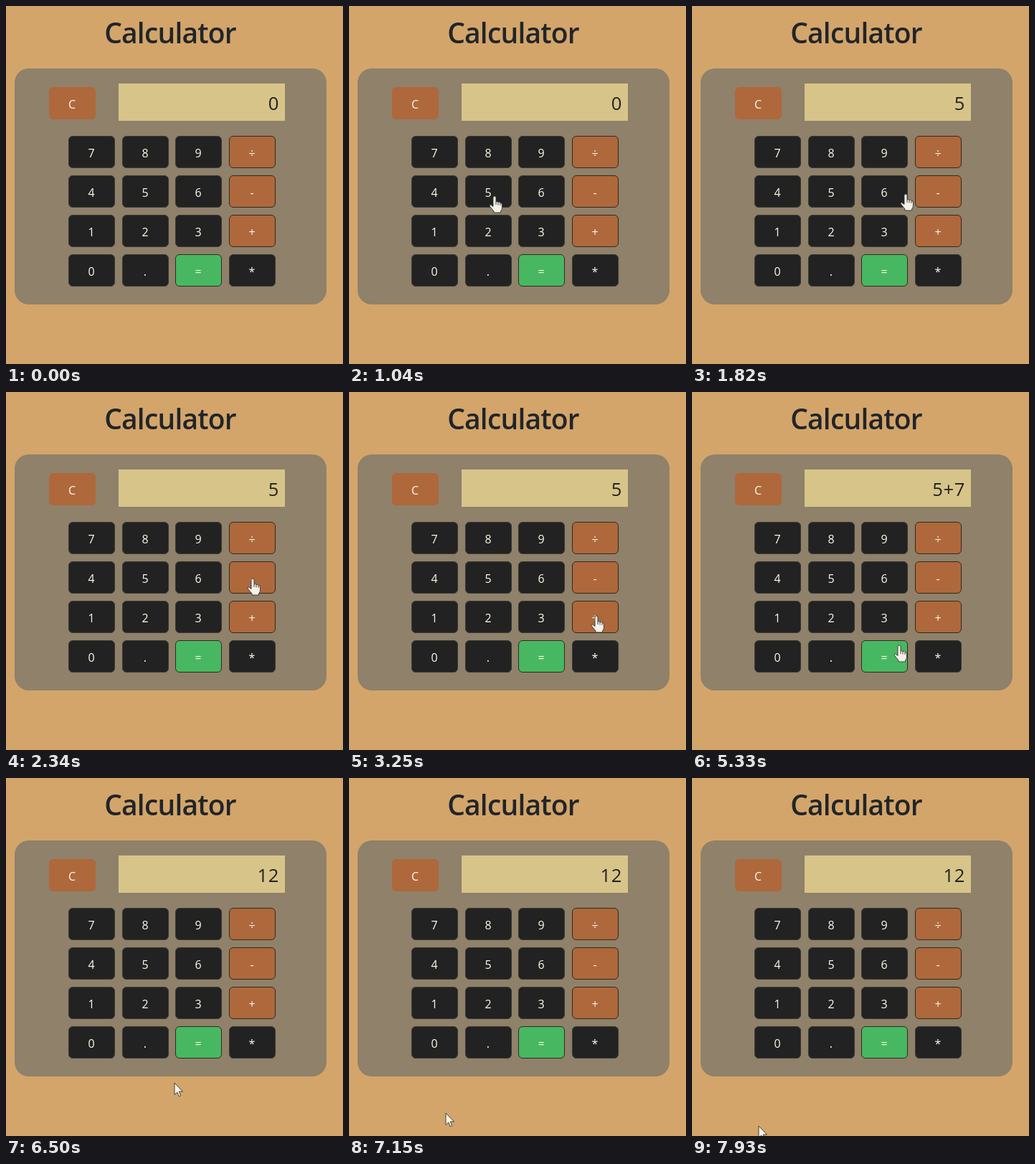
An HTML page for the animation above (8000 ms loop, 470x499 px).

```html
<!DOCTYPE html>
<html lang="en">
<head>
<meta charset="utf-8">
<title>Calculator</title>
<style>
  html, body { margin: 0; width: 100%; height: 100%; overflow: hidden; background: #d3a56a; }
  svg { display: block; }
  text { font: 500 16px "Open Sans", "Noto Sans", sans-serif; fill: #fffbea; text-anchor: middle; }
  text.title { font-size: 39px; font-weight: 600; letter-spacing: -.8px; fill: #212529; }
  text.display { font-size: 25.6px; font-weight: 400; letter-spacing: .6px; fill: #222; text-anchor: end; }
  #cursor path { fill: #f4f1e8; stroke: #333; stroke-width: .9; stroke-linejoin: round; }
</style>
</head>
<body>
<svg width="470" height="499" viewBox="0 0 470 499">
  <text class="title" x="229" y="52">Calculator</text>
  <rect x="12" y="87" width="435" height="329" rx="20" fill="#8f816a"/>
  <rect x="157" y="108" width="232" height="52" fill="#d7c489"/>
  <text class="display" id="display" x="381" y="145">0</text>
  <g id="keys"></g>
  <g id="cursor">
    <path id="arrow" d="M0 0V16.5L3.8 13L6.3 18.8L8.8 17.7L6.3 12H11.5Z"/>
    <path id="hand" d="M-2 2Q-2 0 0 0T2 2V8Q4 7 5 8.5Q7 7.5 8 9.5Q10.5 9 10.5 12V16Q10.5 19 8.5 21V23H-1V21L-6 15Q-8 12 -5.5 12L-2 14.5ZM2 8V12M5 8.5V12.5M8 9.5V13"/>
  </g>
</svg>
<script>
const $ = id => document.getElementById(id);
const LOOP = 8000, STEP = 130, KEY_W = 65, KEY_H = 45;
const DARK = '#222', ORANGE = '#ae683b', GREEN = '#47b861';

const keys = [{ label: 'C', x: 60, y: 113, fill: ORANGE, border: ORANGE }];
[...'789÷456-123+0.=*'].forEach((label, i) => {
  const fill = '÷-+'.includes(label) ? ORANGE : label === '=' ? GREEN : DARK;
  keys.push({
    label, fill,
    x: Math.round(87 + (i % 4) * 224 / 3),
    y: 181 + Math.floor(i / 4) * 55,
    border: fill === DARK ? '#3b3a36' : '#33291f'
  });
});

$('keys').innerHTML = keys.map(k => `
  <rect x="${k.x + .5}" y="${k.y + .5}" width="${KEY_W - 1}" height="${KEY_H - 1}" rx="5.5"
    fill="${k.fill}" stroke="${k.border}"/>
  <text x="${k.x + 32}" y="${k.y + 29.5}">${k.label}</text>`).join('');

// The pointer rests at each stop; the readout changes as it leaves.
const stops = [
  { arrive: 130, leave: 130, x: 222, y: 476, shows: '0' },
  { arrive: 1040, leave: 1430, x: 203, y: 265, shows: '5' },
  { arrive: 2340, leave: 2340, x: 344, y: 260, shows: '5' },
  { arrive: 3250, leave: 3510, x: 345, y: 312, shows: '5+' },
  { arrive: 4420, leave: 4550, x: 130, y: 225, shows: '5+7' },
  { arrive: 5330, leave: 5850, x: 289, y: 353, shows: '12' },
  { arrive: 6500, leave: 6500, x: 235, y: 425, shows: '12' },
  { arrive: 7930, leave: LOOP, x: 93, y: 485, shows: '12' }
];

const easeOut = f => 1 - (1 - f) ** 2;

function render(now) {
  const t = Math.floor(now % LOOP / STEP) * STEP;
  const last = stops.filter(s => s.leave <= t).pop();
  $('cursor').style.display = last ? '' : 'none';
  $('display').textContent = last ? last.shows : '0';
  if (!last) return;

  const next = stops[stops.indexOf(last) + 1];
  const f = easeOut(Math.min(1, (t - last.leave) / (next.arrive - last.leave)));
  const x = Math.round(last.x + (next.x - last.x) * f);
  const y = Math.round(last.y + (next.y - last.y) * f);
  const over = keys.some(k => x >= k.x && x < k.x + KEY_W && y >= k.y && y < k.y + KEY_H);
  $('cursor').setAttribute('transform', `translate(${x} ${y})`);
  $('hand').style.display = over ? '' : 'none';
  $('arrow').style.display = over ? 'none' : '';
}

const start = performance.now();
(function tick() {
  render(performance.now() - start);
  requestAnimationFrame(tick);
})();
</script>
</body>
</html>
```
